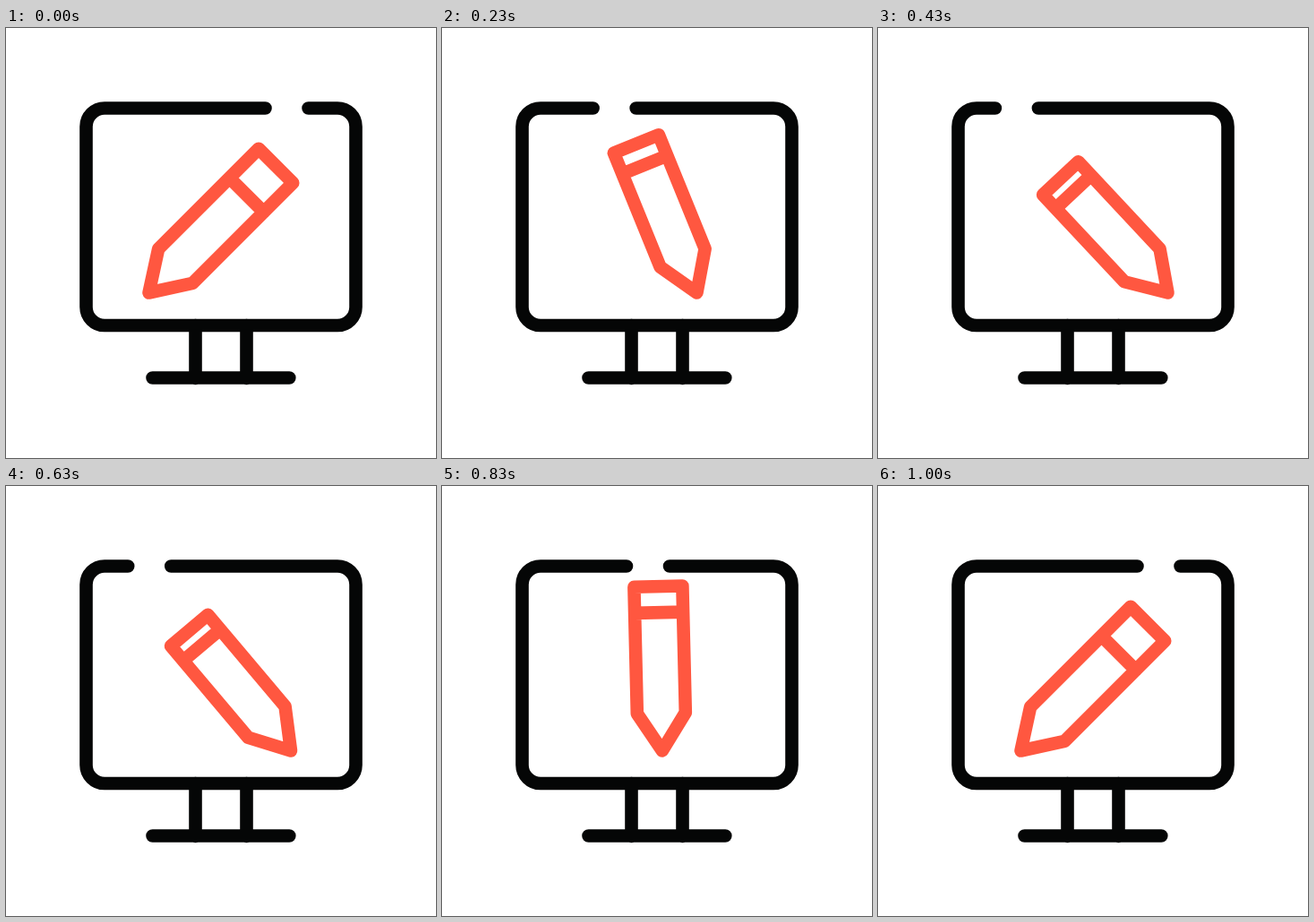
These frames come from a looping animation (480 px wide and 480 px high, 1030 ms). An HTML page:

```html
<!DOCTYPE html>
<html lang="en">
<head>
<meta charset="utf-8">
<title>Pencil on a monitor</title>
<style>
  html, body { margin: 0; width: 100%; height: 100%; overflow: hidden; background: #fff; }
  svg { display: block; width: 100%; height: 100%; }
  path { fill: none; stroke: #050606; stroke-width: 14.6; stroke-linecap: round; stroke-linejoin: round; }
  #pencil { stroke: #ff5740; }
</style>
</head>
<body>
<svg viewBox="0 0 480 480">
  <path d="M211.5 332V391M268.5 332V391M163.5 390.5H316.3"/>
  <path id="screen"/>
  <path id="pencil"/>
</svg>
<script>
const LOOP = 1030;
const screenPath = document.getElementById('screen');
const pencil = document.getElementById('pencil');

// Outward swing: [step, position, speed per step]
const SWING = [[0, 0, .06], [4, .352, .118], [7, .746, .11], [13, .979, .013], [16, 1.018, .02], [17, 1.045, .027]];

function hermite([k0, p0, v0], [k1, p1, v1], k) {
  const d = k1 - k0, s = (k - k0) / d, r = 1 - s;
  return p0 * r * r * (1 + 2 * s) + v0 * d * s * r * r
       + p1 * s * s * (3 - 2 * s) - v1 * d * s * s * r;
}

// 0 = leaning right, 1 = leaning left
function swing(k) {
  if (k > 17) {
    const n = k - 17;
    return Math.max(0, 1.045 - .0438 * n - .0028 * n * n);
  }
  const i = Math.max(1, SWING.findIndex(key => key[0] >= k));
  return hermite(SWING[i - 1], SWING[i], k);
}

function draw(ms) {
  // 30 steps per second, on a 10 ms clock
  const step = Math.floor((Math.floor(ms / 10) * 3 + 1) / 10);
  const u = step >= 30 ? 0 : swing(step);

  const gap = 289.5 - 162 * u;
  screenPath.setAttribute('d',
    `M${gap} 89.5H110a20.5 20.5 0 0 0-20.5 20.5V311.5a20.5 20.5 0 0 0 20.5 20.5` +
    `H370a20.5 20.5 0 0 0 20.5-20.5V110a20.5 20.5 0 0 0-20.5-20.5H${gap + 48}`);

  // The eraser shortens as the pencil swings left
  const band = -154.3;
  const top = band - (46 - 51.6 * u + 47.9 * u * u - 22 * u ** 3);
  pencil.setAttribute('d', `M0 0L-27-42V${top}H27V-42ZM-27 ${band}H27`);
  pencil.setAttribute('transform', `translate(${159.5 + 167.5 * u} 295.5) rotate(${45 - 90 * u})`);
}

const start = performance.now();
function tick() {
  draw((performance.now() - start) % LOOP);
  requestAnimationFrame(tick);
}
tick();
</script>
</body>
</html>
```
